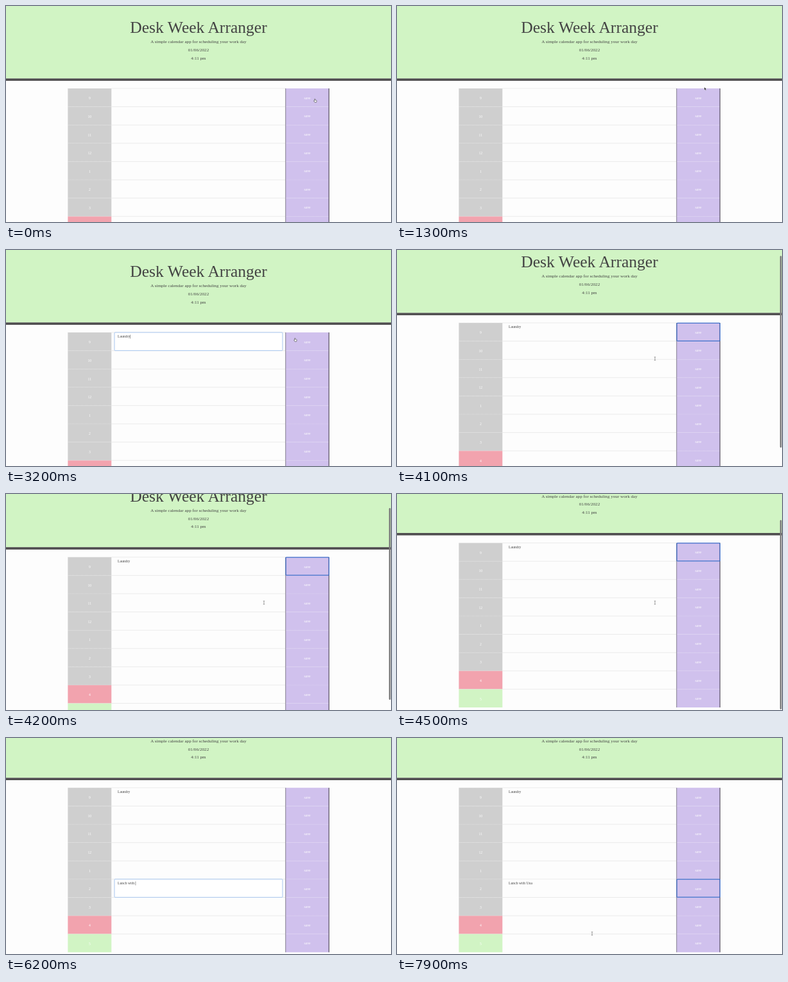
An HTML page for the animation above (8000 ms loop, 600 by 338 pixels).

```html
<!DOCTYPE html>
<html lang="en">
<head>
<meta charset="utf-8">
<title>Day planner</title>
<style>
  html, body { margin: 0; width: 100%; height: 100%; overflow: hidden; background: #fdfdfd; }
  svg { display: block; width: 100vw; height: 100vh; }
  text { font-family: "Liberation Serif", "Times New Roman", serif; font-size: 5.7px; fill: #444; white-space: pre; }
  .mid { text-anchor: middle; }
  .lead { font-size: 7.13px; }
  .title { font-size: 25.6px; }
  .label { fill: #fff; }
</style>
</head>
<body>
<svg id="stage" viewBox="0 0 600 338"></svg>
<script>
const LOOP = 8000, STEP = 100;
const TOP = 129, ROW = 28.6, LEFT = 96.4, TEXT_X = 164.3, SAVE_X = 435.8, RIGHT = 503.6;
const HOURS = [9, 10, 11, 12, 1, 2, 3, 4, 5];
const stage = document.getElementById('stage');

function add(parent, tag, attrs, content = '') {
  const node = document.createElementNS('http://www.w3.org/2000/svg', tag);
  set(node, attrs);
  node.textContent = content;
  return parent.appendChild(node);
}
function set(node, attrs) {
  for (const key in attrs) node.setAttribute(key, attrs[key]);
}
function rect(parent, x, y, width, height, fill, more = {}) {
  return add(parent, 'rect', { x, y, width, height, fill, ...more });
}
function rule(parent, x1, x2, y, stroke, more = {}) {
  return add(parent, 'line', { x1, x2, y1: y, y2: y, stroke, 'stroke-width': 0.6, ...more });
}
function centred(parent, y, cls, content, x = 300) {
  return add(parent, 'text', { x, y, class: 'mid ' + cls }, content);
}
function show(node, on) {
  node.setAttribute('visibility', on ? 'visible' : 'hidden');
}

const page = add(stage, 'g', {});
rect(page, 0, -5, 600, 118.5, '#d1f4c4');
rect(page, 0, 113.4, 600, 3.7, '#504e50');
centred(page, 42.3, 'title', 'Desk Week Arranger');
centred(page, 58.1, 'lead', 'A simple calendar app for scheduling your work day');
centred(page, 70.9, 'lead', '01/06/2022');
centred(page, 83.6, 'lead', '4:11 pm');

HOURS.forEach((hour, i) => {
  const y = TOP + i * ROW;
  const fill = i < 7 ? '#cfcfcf' : i === 7 ? '#f2a3ae' : '#d1f4c4';
  rect(page, LEFT, y, TEXT_X - LEFT, ROW, fill);
  rect(page, SAVE_X, y, RIGHT - SAVE_X, ROW, '#d0c1ed');
  rule(page, LEFT, TEXT_X, y, '#e4e4e4', { 'stroke-dasharray': '1 1' });
  rule(page, TEXT_X, SAVE_X, y, '#dedede');
  rule(page, SAVE_X, RIGHT, y, '#e2d9f3', { 'stroke-dasharray': '1 1' });
  centred(page, y + 17.3, 'label', hour, 130.3);
  centred(page, y + 16.8, 'label', 'save', 469.5);
});
const bottom = TOP + HOURS.length * ROW;
rect(page, SAVE_X - 0.4, TOP, 0.8, bottom - TOP, '#6b6575');
rect(page, RIGHT - 0.9, TOP, 1.2, bottom - TOP, '#5b5663');

const field = rect(page, 169, 0, 262, 28.4, '#fff', { stroke: '#a6c5ee', 'stroke-width': 1, rx: 1 });
const button = rect(page, 436.1, 0, 67.3, 28, 'none', { stroke: '#3d6fca', 'stroke-width': 1.2, rx: 1 });
const caret = rect(page, 0, 0, 0.5, 6, '#333');

// Each entry: time and number of letters typed so far.
const notes = [
  { row: 0, words: 'Laundry', keys: [[2200, 1], [2400, 2], [2500, 4], [2600, 6], [2700, 7]] },
  { row: 5, words: 'Lunch with Una', keys: [[5900, 2], [6000, 5], [6100, 8], [6200, 11], [6400, 12], [6500, 13], [6700, 14]] }
].map(note => ({ ...note, node: add(page, 'text', { x: 174, y: TOP + note.row * ROW + 8.4 }) }));

const thumb = rect(stage, 596.8, 0, 2.6, 300, '#7d7d7d', { rx: 1.3 });

const cursors = {
  arrow: add(stage, 'path', { d: 'M0 0V4.6L1.1 3.6 1.9 5.3 2.7 4.9 1.9 3.3H3.3Z', fill: '#222', stroke: '#fff', 'stroke-width': 0.3 }),
  hand: add(stage, 'path', {
    d: 'M-1.2 .4V-2.3Q-.7 -3.1-.2 -2.3V-.8L1.8 -.4Q2.3 -.2 2.2 .6L1.7 2.7H-.9L-2.3 .6Q-2.2 -.3-1.2 .4Z',
    fill: '#fff', stroke: '#444', 'stroke-width': 0.65
  }),
  beam: add(stage, 'path', { d: 'M-1.2 -2.7Q0 -2.7 0 -2 0 -2.7 1.2 -2.7M0 -2V2M-1.2 2.7Q0 2.7 0 2 0 2.7 1.2 2.7', fill: 'none', stroke: '#666', 'stroke-width': 0.65 })
};

// Time, x, y, and the pointer shape from that time on.
const pointerPath = [
  [0, 482, 148, 'hand'], [300, 483, 144, 'hand'], [500, 483, 144, 'hand'], [700, 482, 140, 'hand'],
  [900, 482, 140, 'hand'], [1200, 479, 127, 'arrow'], [1500, 479, 127, 'arrow'], [1600, 465, 130, 'hand'],
  [1800, 400, 136, 'beam'], [2100, 271, 139, 'beam'], [2400, 271, 139, ''],
  [2900, 320, 143, ''], [3000, 350, 143, 'beam'], [3200, 451, 140.5, 'hand'], [3500, 451, 140.5, 'hand'],
  [3600, 438, 147, 'hand'], [3900, 438, 147, 'hand'], [4000, 402, 170, 'beam'], [4900, 402, 170, 'beam'],
  [5600, 330, 229, 'beam'], [5900, 330, 229, ''], [6900, 350, 232, ''], [7000, 370, 233, 'beam'],
  [7200, 450, 238, 'hand'], [7300, 456, 238, 'hand'], [7400, 456, 238, 'hand'], [7500, 448, 236, 'hand'],
  [7800, 448, 236, 'hand'], [7900, 304, 306, 'beam'], [8000, 304, 306, 'beam']
];

const scrollPath = [
  [0, 0], [3900, 0], [4000, 4], [4100, 15], [4200, 30.2], [4300, 42],
  [4400, 50], [4500, 52.4], [4600, 52.1], [4800, 51.1], [8000, 51.1]
];

function sample(path, time, column) {
  const next = Math.max(1, path.findIndex(point => point[0] > time));
  const a = path[next - 1], b = path[next];
  return a[column] + (b[column] - a[column]) * (time - a[0]) / (b[0] - a[0]);
}
const latest = (list, time) => list.filter(item => item[0] <= time).pop();
const within = (time, from, to) => time >= from && time < to;

function draw(time) {
  const scroll = sample(scrollPath, time, 1);
  page.setAttribute('transform', `translate(0 ${-scroll})`);

  const writing = within(time, 2100, 3300) ? 0 : within(time, 5700, 7300) ? 1 : -1;
  const saved = within(time, 3300, 5700) ? 0 : time >= 7300 ? 1 : -1;
  show(field, writing >= 0);
  show(caret, writing >= 0);
  show(button, saved >= 0);
  if (saved >= 0) button.setAttribute('y', TOP + notes[saved].row * ROW + 0.3);

  notes.forEach((note, i) => {
    const key = latest(note.keys, time);
    note.node.textContent = note.words.slice(0, key ? key[1] : 0);
    if (i !== writing) return;
    const y = TOP + note.row * ROW;
    field.setAttribute('y', y);
    set(caret, { x: 174.2 + note.node.getComputedTextLength(), y: y + 3.6 });
  });

  show(thumb, within(time, 4000, 4800));
  const thumbY = 22 + (scroll - 30.2) * 0.84;
  set(thumb, { y: thumbY, height: Math.min(300, 337 - thumbY), opacity: time < 4700 ? 1 : 0.5 });

  const shape = latest(pointerPath, time)[3];
  const place = `translate(${sample(pointerPath, time, 1)} ${sample(pointerPath, time, 2)})`;
  for (const name in cursors) {
    show(cursors[name], name === shape);
    cursors[name].setAttribute('transform', place);
  }
}

const start = performance.now();
function tick() {
  const time = (performance.now() - start) % LOOP;
  draw(Math.floor(time / STEP) * STEP);
  requestAnimationFrame(tick);
}
tick();
</script>
</body>
</html>
```
